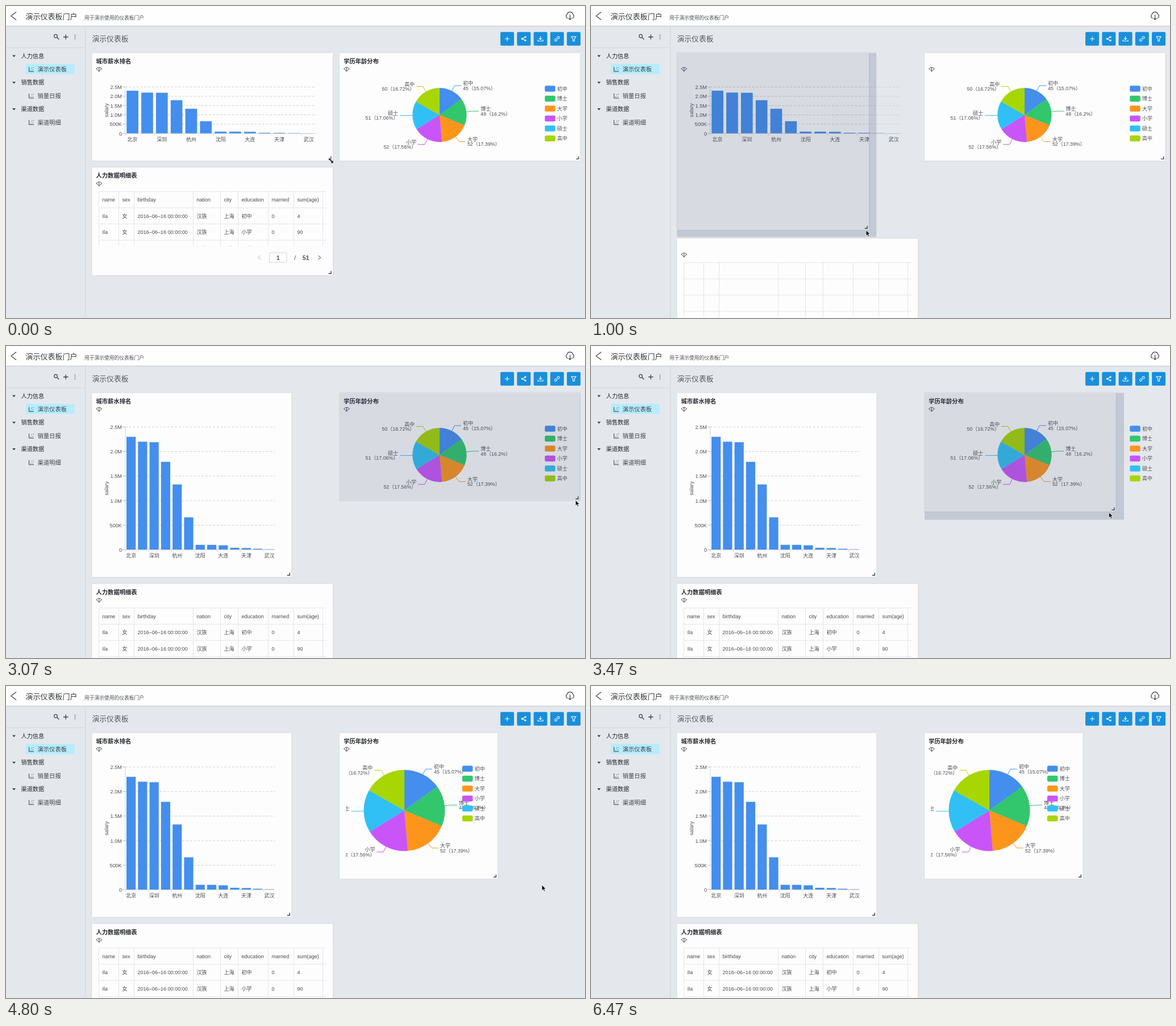
These frames come from a looping animation (1019x549 px, 6.54 s). An HTML page:

```html
<!DOCTYPE html>
<html lang="zh-CN">
<head>
<meta charset="utf-8">
<title>演示仪表板</title>
<style>
html, body { margin: 0; width: 100%; height: 100%; overflow: hidden; background: #e4e8ec; }
svg { display: block; width: 100%; height: 100%; font-family: "Liberation Sans", "Noto Sans CJK SC", "Noto Sans CJK", sans-serif; }
text { white-space: pre; }
.card { fill: #fefdfe; filter: drop-shadow(0 .6px 1px rgba(40, 50, 70, .16)); }
.line { fill: none; stroke: #3c4046; }
.white { fill: none; stroke: #fff; stroke-width: 1.1; }
</style>
</head>
<body>
<svg id="stage" viewBox="0 0 1019 549"></svg>
<script>
const LOOP = 6540, TOP = 82.5, LEFT1 = 151.3, LEFT2 = 587, COL = 72.6, ROW = 33.6, GAP = 12;
const COLORS = ['#448eee', '#32c66d', '#fd951d', '#c955f9', '#31c0f5', '#a7d603'];
const LEVELS = ['初中', '博士', '大学', '小学', '硕士', '高中'];
const COUNTS = [45, 48, 52, 52, 51, 50];
const SHARES = [15.07, 16.2, 17.39, 17.56, 17.06, 16.72];
const SALARIES = [2.3, 2.2, 2.19, 1.79, 1.33, .66, .1, .1, .09, .04, .035, .02, .01];
const CITIES = ['北京', '深圳', '杭州', '沈阳', '大连', '天津', '武汉'];

// y is the vertical centre of the text
const text = (x, y, s, size = 9, fill = '#4c4f54', anchor = 'start', extra = '') =>
  `<text x="${x}" y="${y + size * .37}" font-size="${size}" fill="${fill}" text-anchor="${anchor}" ${extra}>${s}</text>`;
const path = (d, cls = 'line', extra = '') => `<path d="${d}" class="${cls}" ${extra}/>`;
const rect = (x, y, w, h, fill, extra = '') =>
  `<rect x="${x}" y="${y}" width="${w}" height="${h}" fill="${fill}" ${extra}/>`;
const group = (s, attrs = '') => `<g ${attrs}>${s}</g>`;

function header() {
  return rect(0, 0, 1019, 34.7, '#fefefe', 'style="filter:drop-shadow(0 .8px .8px rgba(0,0,0,.32))"') +
    path('M18,10.5 L9,17.5 L18,24.5', 'line', 'stroke-width="1.2"') +
    text(34.5, 18, '演示仪表板门户', 13, '#33363a') +
    text(138, 20.5, '用于演示使用的仪表板门户', 8.75, '#4c4f54') +
    path('M988.5,21.6 A3.9,3.9 0 0 1 987.4,14.6 A5.4,5.4 0 0 1 997.8,14.6 A3.9,3.9 0 0 1 996.6,21.6 M992.6,15.5 V24 M989.9,21.4 L992.6,24.1 L995.3,21.4', 'line', 'stroke-width="1.2"');
}

function sidebar() {
  let s = path('M139.5,36 V549 M0,73.5 H139', 'line', 'style="stroke:#d3d7dc"') +
    '<circle cx="87.5" cy="53" r="2.8" class="line" stroke-width="1.2"/>' +
    path('M89.7,55.2 L93.3,58.8 M101,54.5 H109.5 M105.2,50.2 V58.8', 'line', 'stroke-width="1.3"');
  for (const y of [51, 54.3, 57.6]) s += `<circle cx="121.5" cy="${y}" r=".8" fill="#3c4046"/>`;
  s += rect(35, 102, 85.5, 17.5, '#b5ecfe');
  ['人力信息', '演示仪表板', '销售数据', '销量日报', '渠道数据', '渠道明细'].forEach((name, i) => {
    const y = 88 + i * 23.35;
    s += i % 2
      ? path(`M40.5,${y - 4} v8 h8.5 M43,${y + 1.5} h1.2 M44.5,${y - 2} h1.2 M46.5,${y + 1} h1.2 M47.5,${y - 3} h1.2`) +
        text(55.5, y, name, 10.3, '#3f4247')
      : path(`M11,${y - 1.5} h6 l-3,3.6 z`, '', 'fill="#3c4046"') +
        text(26.5, y, name, 10.2, '#24272b', 'start', 'font-weight="500"');
  });
  return s;
}

function toolbar() {
  const icons = [
    'M-4,0 H4 M0,-4 V4',
    'M2.5,-3 L-2.8,0 L2.5,3 M1.6,-3 a1.1,1.1 0 1 0 2.2,0 a1.1,1.1 0 1 0 -2.2,0 M-4,0 a1.1,1.1 0 1 0 2.2,0 a1.1,1.1 0 1 0 -2.2,0 M1.6,3 a1.1,1.1 0 1 0 2.2,0 a1.1,1.1 0 1 0 -2.2,0',
    'M0,-4.5 V1.5 M-2.5,-1 L0,1.5 L2.5,-1 M-4.5,1.5 V4 H4.5 V1.5',
    'M-1.2,1.2 L1.2,-1.2 M-.4,-2 L1.4,-3.8 A1.8,1.8 0 0 1 3.9,-1.3 L2,.5 M.4,2 L-1.4,3.8 A1.8,1.8 0 0 1 -3.9,1.3 L-2,-.5',
    'M-4,-4 H4 L1.3,.2 V4 H-1.3 V.2 Z'];
  return text(151.5, 57.6, '演示仪表板', 12.8, '#55595f') + icons.map((d, i) =>
    group(rect(-12, -12, 24, 24, '#198fdc', 'rx="2"') + path(d, 'white'),
      `transform="translate(${882.1 + i * 29.25},57.7)"`)).join('');
}

const heading = (x, y, s) =>
  text(x + 7.2, y + 14.5, s, 10.3, '#222529', 'start', 'class="dom" font-weight="700"') +
  path(`M${x + 7.5},${y + 28} q5,-5 10,0 l-3,2 M${x + 7.5},${y + 28} l3,2 M${x + 12.5},${y + 25.5} v7 M${x + 10},${y + 30} l2.5,2.8 l2.5,-2.8`, 'line', 'stroke-width=".9"');

const CORNER = 'M-7.5,-3 H-2.25 M-3,-7.5 V-2.25';
const corner = attrs => path(CORNER, 'line', `${attrs} stroke-width="1.4"`);

function barChart(x0, right, base, id) {
  const y0 = 142.5, step = (right - x0) / 13, h = base - y0;
  let s = '';
  ['0', '500K', '1.0M', '1.5M', '2.0M', '2.5M'].forEach((label, i) => {
    const y = base - h * i / 5;
    s += path(`M205,${y} H${x0}`, 'line', 'style="stroke:#b9bcc1"') + text(204, y, label, 9.2, '#4c4f54', 'end');
    if (i) s += path(`M${x0},${y} H${right}`, 'line', 'style="stroke:#cfd1d5" stroke-dasharray="4 2.7"');
  });
  SALARIES.forEach((v, i) => {
    s += rect(x0 + step * (i + .1), base - h * v / 2.5, step * .8, h * v / 2.5, COLORS[0]);
    if (i % 2 == 0) s += text(x0 + step * (i + .5), base + 10.3, CITIES[i / 2], 9, '#4c4f54', 'middle');
  });
  let axis = `M${x0},${y0} V${base} H${right}`;
  for (let i = 0; i < 7; i++) axis += `M${x0 + step * 2 * i},${base} v3.5`;
  const mid = (y0 + base) / 2;
  s += path(axis, 'line', 'style="stroke:#c6c9ce" stroke-width=".8"') +
    text(177, mid, 'salary', 9.2, '#4c4f54', 'middle', `transform="rotate(-90 177 ${mid})"`);
  return group(s, `id="${id}"`);
}

function pieChart(cx, cy, r, legendX, id) {
  const at = (deg, d) => {
    const a = deg * Math.PI / 180;
    return [cx + d * Math.sin(a), cy - d * Math.cos(a)];
  };
  let s = '', from = 0;
  SHARES.forEach((share, i) => {
    const to = from + share * 3.6, mid = (from + to) / 2, dir = mid < 180 ? 1 : -1;
    const [x, y] = at(mid, r + 10.5), anchor = dir > 0 ? 'start' : 'end';
    s += path(`M${cx},${cy} L${at(from, r)} A${r},${r} 0 0 1 ${at(to, r)} Z`, '', `fill="${COLORS[i]}" stroke="${COLORS[i]}" stroke-width=".3"`) +
      path(`M${at(mid, r)} L${x},${y} h${dir * 11.7}`, 'line', `style="stroke:${COLORS[i]}"`) +
      text(x + dir * 14.7, y - 4.3, LEVELS[i], 9, '#4c4f54', anchor) +
      text(x + dir * 14.7, y + 4.5, `${COUNTS[i]}（${share}%）`, 8.9, '#4c4f54', anchor);
    from = to;
  });
  LEVELS.forEach((name, i) => {
    const y = 145.5 + i * 17.5;
    s += rect(legendX, y - 5.3, 18.5, 10.6, COLORS[i], 'rx="2.5"') + text(legendX + 21.8, y, name);
  });
  return group(s, `id="${id}" clip-path="url(#pieClip)"`);
}

function table() {
  const xs = [163.5, 198.5, 225.5, 329.5, 377.5, 408.5, 461.5, 506.5, 557.5];
  const row = level => ['Ila', '女', '2016–06–16 00:00:00', '汉族', '上海', ...level];
  const rows = [['name', 'sex', 'birthday', 'nation', 'city', 'education', 'married', 'sum(age)'],
    row(['初中', '0', '4']), row(['小学', '0', '90']), row(['大学', '0', '52'])];
  let lines = '', cells = '';
  xs.forEach(x => lines += `M${x},42.5 V140`);
  rows.forEach((r, i) => {
    lines += `M163,${42.5 + i * 28.5} H564`;
    r.forEach((s, j) => cells += text(xs[j] + 5.9, 57 + i * 28.5, s, 9.1, '#484b50', 'start', 'class="dom"'));
  });
  const nav = '#55595f';
  return rect(LEFT1, 0, 423.8, 189.6, '#fefdfe', 'class="card"') + heading(LEFT1, 0, '人力数据明细表') +
    group(path(lines, 'line', 'style="stroke:#e3e5e9"') + cells, 'clip-path="url(#tableClip)"') +
    path('M448,155 l-4.5,3.5 l4.5,3.5', 'line', 'style="stroke:#b4b7bc"') +
    path('M549.5,155 l4.5,3.5 l-4.5,3.5') +
    rect(463.5, 150, 30.5, 17, '#fff', 'rx="2" stroke="#d0d3d8"') +
    text(479, 158.8, '1', 10.5, nav, 'middle', 'font-weight="700"') +
    text(508.5, 158.8, '/', 11, nav, 'middle') + text(527.7, 158.8, '51', 10.8, nav, 'middle', 'font-weight="700"') +
    corner(`transform="translate(${LEFT1 + 423.8},189.6)"`);
}

const pointers =
  path('M0,0 V10 L2.4,7.9 L4,11.5 L5.8,10.7 L4.2,7.2 L7.3,7 Z', '', 'id="arrow" fill="#111" stroke="#fff" stroke-width=".8"') +
  path('M-4,-4 H0 L-1.3,-2.7 L2.5,1.1 L4,-.4 V4.4 H-.8 L.9,2.7 L-2.7,-1.3 L-4,0 Z', '', 'id="resize" fill="#111" stroke="#fff" stroke-width=".5"');

const stage = document.getElementById('stage');
stage.innerHTML =
  '<clipPath id="pieClip"><rect x="598" y="82" width="421" height="300"/></clipPath>' +
  '<clipPath id="tableClip"><rect x="160" y="40" width="403.5" height="98.4"/></clipPath>' +
  rect(0, 0, 1019, 549, '#e4e8ec') + sidebar() + toolbar() +
  group(table(), 'id="table"') +
  rect(LEFT1, TOP, 424, 190, '#fefdfe', 'class="card" id="card1"') + heading(LEFT1, TOP, '城市薪水排名') +
  barChart(209.7, 545.6, 224.3, 'bars1') + barChart(210, 473.6, 358.5, 'bars2') + corner('id="corner1"') +
  rect(LEFT2, TOP, 424, 190, '#fefdfe', 'class="card" id="card2"') + heading(LEFT2, TOP, '学历年龄分布') +
  pieChart(763, 191.7, 47.5, 948.3, 'pie1') + pieChart(701, 219, 71.3, 803, 'pie2') + corner('id="corner2"') +
  rect(0, TOP, 0, 0, 'rgba(60,75,110,.2)', 'id="ghost"') + header() + group(pointers, 'id="pointer"');

const $ = id => document.getElementById(id);
const domText = stage.querySelectorAll('.dom');
const set = (el, attrs) => { for (const k in attrs) el.setAttribute(k, attrs[k]); };
const show = (el, on) => { el.style.display = on ? '' : 'none'; };

// Pointer route: time, x, y
const ROUTE = [[300, 572, 272], [450, 540, 289], [530, 515, 314], [862, 490, 390], [1000, 484, 394.5], [1150, 484, 394.5],
  [1800, 929, 303.5], [2250, 929, 303.5], [2850, 1007, 270], [3050, 1007, 270], [3470, 911.5, 292.5], [3950, 858, 337],
  [4150, 858, 337], [4650, 943, 350]];
const DRAGS = [
  { left: LEFT1, from: 300, to: 1040, card: 'card1', corner: 'corner1' },
  { left: LEFT2, from: 3050, to: 4050, card: 'card2', corner: 'corner2' }];

function pointer(t) {
  const i = ROUTE.findIndex(k => k[0] > t);
  if (i == 0) return ROUTE[0].slice(1);
  if (i < 0) return ROUTE[ROUTE.length - 1].slice(1);
  const [a, b] = [ROUTE[i - 1], ROUTE[i]], p = (t - a[0]) / (b[0] - a[0]);
  return [1, 2].map(j => a[j] + (b[j] - a[j]) * p);
}

// Transitions are a running mean over the last `span` ms
function mean(f, t, span) {
  const n = 50;
  let sum = [0, 0];
  for (let i = 0; i < n; i++) {
    const v = f(t - span * (i + .5) / n);
    sum = sum.map((s, j) => s + v[j] / n);
  }
  return sum;
}

const pulled = (d, t) => {
  const [x, y] = pointer(Math.min(Math.max(t, d.from), d.to));
  return [x + 3.4 - d.left, y + 1 - TOP];
};
const cells = (d, t) => {
  const [w, h] = pulled(d, t);
  return [Math.round((w + GAP) / COL), Math.round((h + GAP) / ROW)];
};
const snapped = (d, t) => {
  const [c, r] = cells(d, t);
  return [c * COL - GAP, r * ROW - GAP];
};
const size = (d, t) => t > d.from && t < d.to ? pulled(d, t) : snapped(d, t);

function draw(t) {
  show($('ghost'), false);
  for (const d of DRAGS) {
    const [w, h] = mean(u => size(d, u), t, 80);
    set($(d.card), { width: w, height: h });
    set($(d.corner), { transform: `translate(${d.left + w},${TOP + h})` });
    if (t > d.from && t < d.to + 100) {
      const [gw, gh] = snapped(d, t);
      set($('ghost'), { x: d.left, width: gw, height: gh });
      show($('ghost'), true);
    }
  }
  const [, rows] = mean(u => cells(DRAGS[0], u), t, 200);
  set($('table'), { transform: `translate(0,${TOP + rows * ROW})` });
  const hidden = t > 900 && t < 1130;
  domText.forEach(el => show(el, !hidden));
  show($('bars1'), t < 1300);
  show($('bars2'), t >= 1300);
  show($('pie1'), t < 4350);
  show($('pie2'), t >= 4350);
  set($('pointer'), { transform: `translate(${pointer(t)})` });
  show($('pointer'), t < 5000);
  show($('resize'), t < 900);
  show($('arrow'), t >= 900);
}

const start = performance.now();
function frame() {
  draw((performance.now() - start) % LOOP);
  requestAnimationFrame(frame);
}
frame();
</script>
</body>
</html>
```
